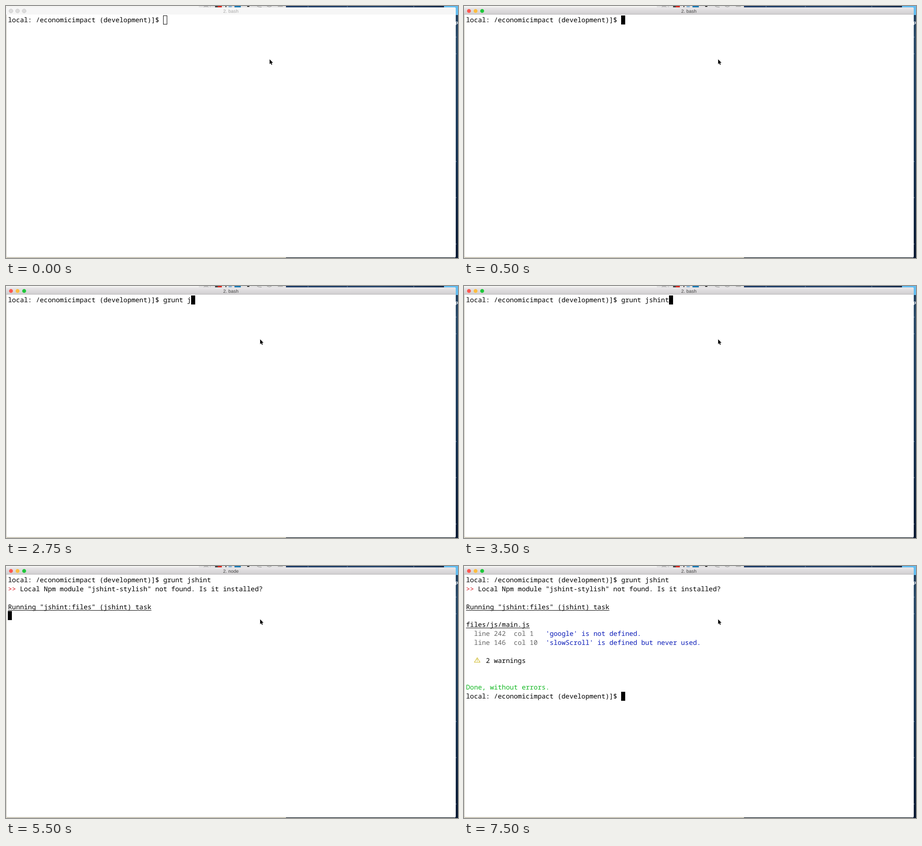
Animation of 1001x559 px, one loop 8000 ms. Source, as an HTML page:

```html
<!DOCTYPE html>
<html lang="en">
<head>
<meta charset="utf-8">
<title>Terminal</title>
<style>
  html, body { margin: 0; width: 100%; height: 100%; overflow: hidden; background: #fff; }
  svg { display: block; width: 100%; height: 100%; }
  text { white-space: pre; text-rendering: geometricPrecision; }
  #screen text { font: 14.7px "Noto Sans Mono", "DejaVu Sans Mono", monospace; }
  #title { font: 10.3px "Liberation Sans", Arial, sans-serif; text-anchor: middle; }
</style>
</head>
<body>
<svg viewBox="0 0 1001 559" preserveAspectRatio="none">
  <defs>
    <linearGradient id="bar" x1="0" y1="0" x2="0" y2="1">
      <stop offset="0" stop-color="#e9e7e9"/>
      <stop offset="1" stop-color="#cfcdcf"/>
    </linearGradient>
    <linearGradient id="night" x1="0" y1="0" x2="0" y2="1">
      <stop offset="0" stop-color="#1d3a58"/>
      <stop offset=".12" stop-color="#2b4b69"/>
      <stop offset=".5" stop-color="#1b3a5a"/>
      <stop offset="1" stop-color="#0a1a33"/>
    </linearGradient>
    <linearGradient id="sky">
      <stop offset="0" stop-color="#1d3c68"/>
      <stop offset=".6" stop-color="#25456c"/>
      <stop offset="1" stop-color="#12294a"/>
    </linearGradient>
  </defs>

  <g id="desktop">
    <rect width="620" height="559" fill="#d9d5c3"/>
    <rect width="620" height="3" fill="#f4f4f2"/>
    <rect x="427" width="193" height="3" fill="#e2e2e2"/>
    <rect x="620" width="381" height="559" fill="url(#night)"/>
    <rect x="620" width="350" height="3" fill="url(#sky)"/>
    <rect x="970" width="31" height="20" fill="#62bdf0"/>
    <g fill="none" stroke="#8a8a8a">
      <path d="M438 2.5l3-2 2 1.5 2-1.5 3 2M556 .5l4 1.5 6 .5M578 .5q6 3 10 0M602 1h11"/>
      <path d="M452.5 0v3" stroke="#bbb"/>
    </g>
    <rect x="463" width="7" height="3" fill="#444"/>
    <rect x="469" width="9" height="3" fill="#d8281e"/>
    <rect x="486" width="2" height="2.5" fill="#333"/>
    <rect x="493" width="7" height="3" fill="#86b4d6"/>
    <rect x="506" width="14" height="3" fill="#1679b4"/>
    <rect x="534" width="5" height="2" fill="#333"/>
    <g id="stars" fill="#9db4c8"></g>
    <text x="995" y="40" fill="#fff" font-family="Liberation Sans, Arial, sans-serif" font-weight="bold" font-size="10">p</text>
  </g>

  <path d="M0 557V6q0-3 3-3H993q3 0 3 3V555q0 3-3 3H3q-3 0-3-3z" fill="#fff"/>
  <path d="M.5 19V555q0 2.5 2.5 2.5H993" fill="none" stroke="#b9b6a8"/>
  <path id="chrome" d="M0 19V7q0-4 4-4H992q4 0 4 4V19z"/>
  <path id="edge" d="M0 18.5H996" stroke="#b8b6b8"/>
  <g id="lights"></g>
  <text id="title" x="498" y="14.8"></text>
  <g id="screen"></g>
  <rect id="caret" height="20"/>
  <path id="mouse" d="M0 0V10.7L2.4 8.5L4 12.3L5.8 11.5L4.2 7.8H7.4Z" stroke="#fff" stroke-width="1" paint-order="stroke"/>
</svg>
<script>
const LOOP = 8000, LEFT = 4.5, CELL = 8.82, ROW = 19.85;
const PROMPT = "local: /economicimpact (development)]$ ";
const COMMAND = "grunt jshint";
const GREY = "#666", BLUE = "#0b1cb8";
const $ = id => document.getElementById(id);

function add(parent, tag, attrs, content) {
  const el = document.createElementNS("http://www.w3.org/2000/svg", tag);
  for (const k in attrs) el.setAttribute(k, attrs[k]);
  if (content) el.textContent = content;
  return parent.appendChild(el);
}

const colX = col => LEFT + col * CELL;

function print(parent, row, col, str, fill = "#000") {
  return add(parent, "text", { x: colX(col), y: 36 + row * ROW, fill }, str);
}

function underlined(parent, row, str) {
  print(parent, row, 0, str);
  const y = Math.round(38 + row * ROW) + 0.5;
  add(parent, "path", { d: `M${LEFT} ${y}H${colX(str.length)}`, stroke: "#000" });
}

const screen = $("screen");
const inputLine = print(screen, 0, 0, PROMPT);

const intro = add(screen, "g", {});
print(intro, 1, 0, ">>", "#d4141c");
print(intro, 1, 3, 'Local Npm module "jshint-stylish" not found. Is it installed?');
underlined(intro, 3, 'Running "jshint:files" (jshint) task');

const report = add(screen, "g", {});
underlined(report, 5, "files/js/main.js");
print(report, 6, 2, "line 242  col 1", GREY);
print(report, 6, 20, "'google' is not defined.", BLUE);
print(report, 7, 2, "line 146  col 10", GREY);
print(report, 7, 20, "'slowScroll' is defined but never used.", BLUE);
add(report, "path", {
  d: "M29.3 203.5L35.5 213.5H23ZM29.3 206.5V210.3M29.3 211.2V212.3",
  fill: "none", stroke: "#cdb824", "stroke-width": 1.2, "stroke-linejoin": "round"
});
print(report, 9, 5, "2 warnings");
print(report, 12, 0, "Done, without errors.", "#12b822");
print(report, 13, 0, PROMPT);

const lights = ["#fc5850", "#fdbd3e", "#1fc73b"].map((color, i) => ({
  color, el: add($("lights"), "circle", { cx: 11 + i * 14.6, cy: 11, r: 4.3 })
}));

for (const y of [69, 106, 345, 425, 528]) add($("stars"), "circle", { cx: 997, cy: y, r: 0.8 });
for (const x of [669, 756, 903]) add($("stars"), "circle", { cx: x, cy: 1.5, r: 0.8 });

// [start time, characters typed]
const typing = [[0, 0], [1250, 2], [1500, 5], [1750, 6], [2750, 7], [3000, 9], [3250, 11], [3500, 12]];

function caretCell(t, typed) {
  if (t < 4000) return [0, PROMPT.length + typed];
  if (t < 5500) return [1, 0];
  if (t < 6000) return [4, 0];
  return [13, PROMPT.length];
}

function set(el, attrs) {
  for (const k in attrs) el.setAttribute(k, attrs[k]);
}

function draw(t) {
  const focused = t >= 250, active = t >= 500;
  const typed = typing.filter(([start]) => t >= start).pop()[1];
  const [row, col] = caretCell(t, typed);

  inputLine.textContent = PROMPT + COMMAND.slice(0, typed);
  set(intro, { visibility: t >= 5500 ? "visible" : "hidden" });
  set(report, { visibility: t >= 6000 ? "visible" : "hidden" });

  const x = Math.round(colX(col) - 0.4), y = Math.round(20.5 + row * ROW);
  set($("caret"), focused
    ? { x, y, width: 9, height: 20, fill: "#000", stroke: "none" }
    : { x: x + 0.5, y: y + 0.5, width: 8, height: 19, fill: "none", stroke: "#000" });

  set($("chrome"), { fill: active ? "url(#bar)" : "#f6f6f6" });
  set($("edge"), { visibility: active ? "visible" : "hidden" });
  for (const { color, el } of lights) {
    set(el, { fill: active ? color : "#dcdcdc", stroke: active ? "none" : "#cacaca" });
  }
  set($("title"), { fill: active ? "#444" : "#aaa" });
  $("title").textContent = t >= 5250 && t < 6750 ? "2. node" : "2. bash";
  set($("mouse"), { transform: `translate(${focused ? 562.8 : 583.8} 118.3)` });
}

function tick() {
  draw(performance.now() % LOOP);
  requestAnimationFrame(tick);
}
tick();
</script>
</body>
</html>
```
